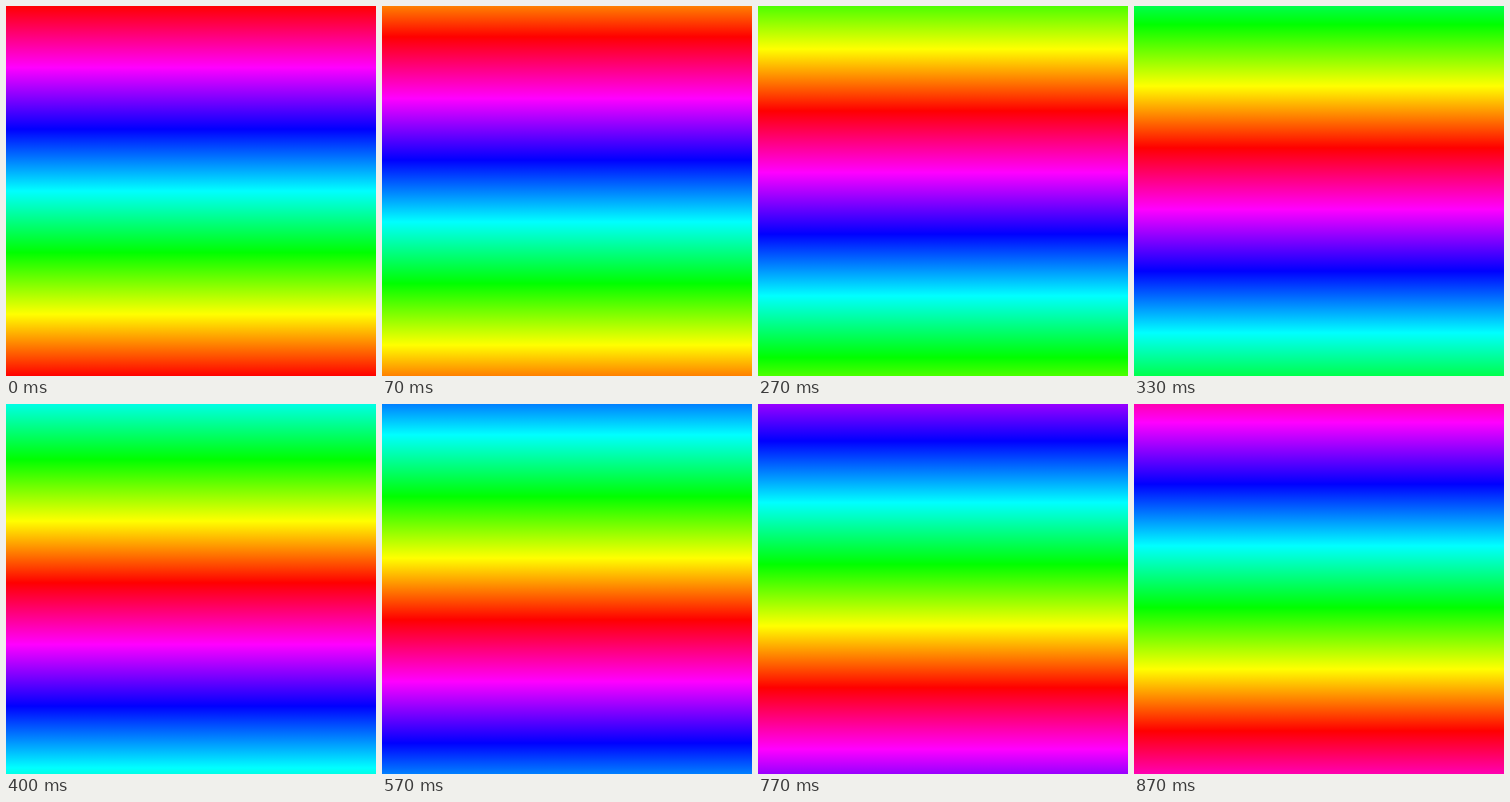
Animation, 480 px wide and 480 px high, one loop 0.91 s. Source, as an HTML page:

```html
<!DOCTYPE html>
<html lang="en">
<head>
<meta charset="utf-8">
<title>Scrolling rainbow</title>
<style>
  html, body { margin: 0; width: 100%; height: 100%; overflow: hidden; }
  #sky {
    width: 100%;
    height: 100%;
    background: linear-gradient(#f00, #f0f, #00f, #0ff, #0f0, #ff0, #f00) 0 0 / 100% 480px repeat;
  }
</style>
</head>
<body>
<div id="sky"></div>
<script>
  const LOOP = 910, STEPS = 27, TICK = 8;
  // [step, vertical shift in ticks of 8 px]
  const path = [[0, 0], [5, 12], [8, 17], [12, 29], [17, 35], [23, 46], [26, 53]];

  function shiftAt(step) {
    const i = Math.max(1, path.findIndex(([s]) => s >= step));
    const [s0, n0] = path[i - 1], [s1, n1] = path[i];
    return TICK * Math.round(n0 + (n1 - n0) * (step - s0) / (s1 - s0));
  }

  const frames = Array.from({ length: STEPS }, (_, k) => ({
    offset: Math.round(k * 10 / 3) * 10 / LOOP,
    backgroundPosition: `0px ${shiftAt(k)}px`,
    easing: 'steps(1, end)'
  }));
  frames.push({ offset: 1, backgroundPosition: '0px 480px' });

  document.getElementById('sky').animate(frames, { duration: LOOP, iterations: Infinity });
</script>
</body>
</html>
```
